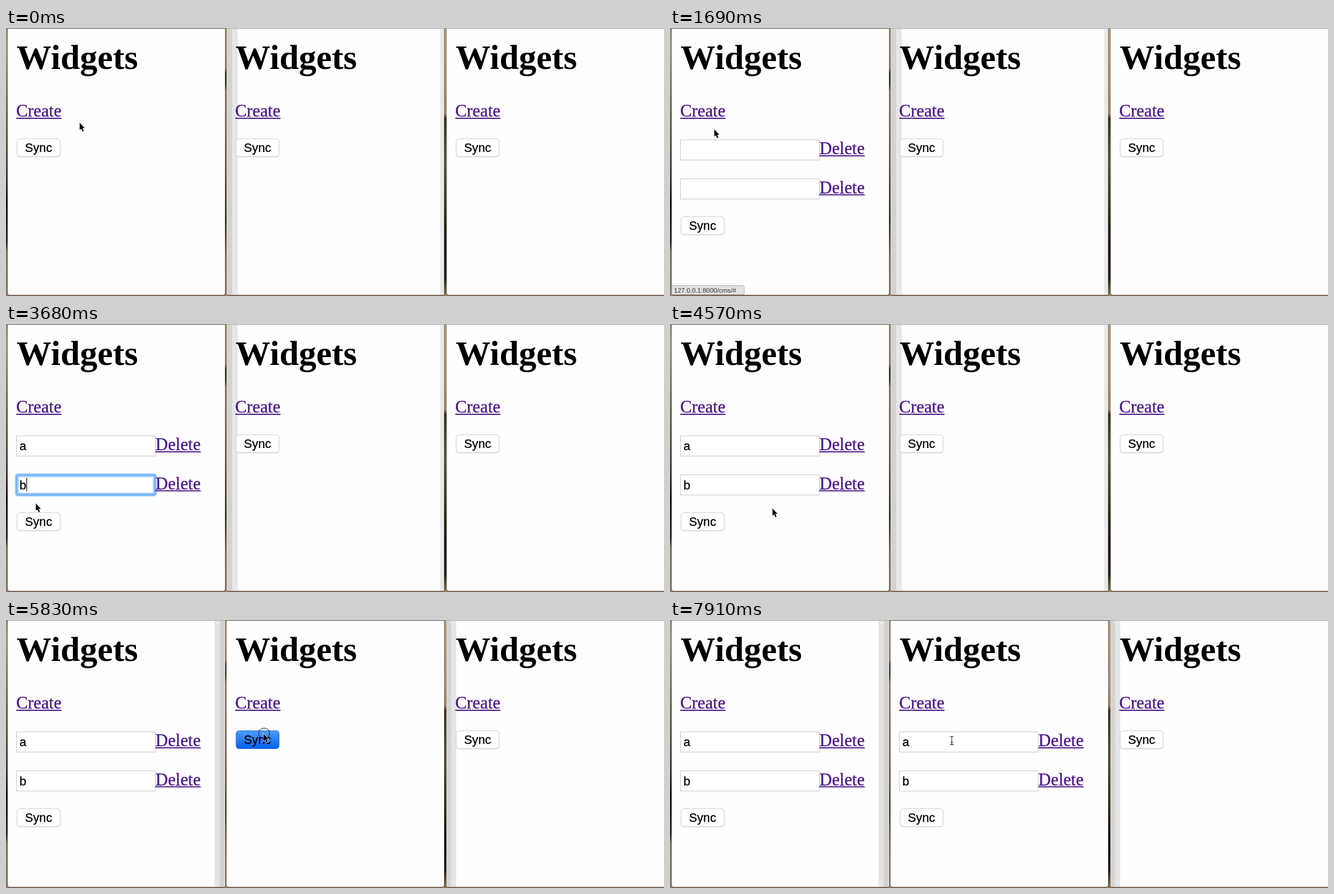
Write an HTML page that moves like this. It is 1170 px wide and 478 px high and loops after 8 s.

```html
<!DOCTYPE html>
<html lang="en">
<head>
<meta charset="utf-8">
<title>Widgets</title>
<style>
  html, body { margin: 0; width: 100%; height: 100%; overflow: hidden; background: #8b775b; }
  svg { display: block; width: 100%; height: 100%; }
  text { white-space: pre; }
  .title { font: bold 62px "Liberation Serif", Times, serif; }
  .link { font: 30.8px "Liberation Serif", Times, serif; stroke-width: .35px; }
  .ui { font: 21.7px "Liberation Sans", Arial, sans-serif; stroke: #000; stroke-width: .3px; }
  .status { font: 11.5px "Liberation Sans", Arial, sans-serif; fill: #222; }
</style>
</head>
<body>
<svg viewBox="0 0 1170 478" preserveAspectRatio="none">
  <defs>
    <linearGradient id="edge" x2="0" y2="1">
      <stop offset="0" stop-color="#9c8a72"/><stop offset=".08" stop-color="#b39a7a"/>
      <stop offset=".25" stop-color="#8d7655"/><stop offset=".55" stop-color="#51412a"/>
      <stop offset=".66" stop-color="#1f170c"/><stop offset=".8" stop-color="#3b2e1a"/>
      <stop offset=".84" stop-color="#8a7657"/><stop offset="1" stop-color="#947f62"/>
    </linearGradient>
    <linearGradient id="gap1" x2="0" y2="1">
      <stop offset="0" stop-color="#a18a6c"/><stop offset=".15" stop-color="#8f7a5c"/>
      <stop offset=".17" stop-color="#2c2318"/><stop offset=".21" stop-color="#2c2318"/>
      <stop offset=".24" stop-color="#8d7858"/><stop offset=".5" stop-color="#6d5a3e"/>
      <stop offset=".72" stop-color="#2a2012"/><stop offset=".85" stop-color="#7b6849"/>
      <stop offset="1" stop-color="#8b775b"/>
    </linearGradient>
    <linearGradient id="gap2" x2="0" y2="1">
      <stop offset="0" stop-color="#b89e7e"/><stop offset=".32" stop-color="#a88d6c"/>
      <stop offset=".34" stop-color="#3c3320"/><stop offset=".5" stop-color="#625538"/>
      <stop offset=".7" stop-color="#3a3018"/><stop offset=".82" stop-color="#1b150a"/>
      <stop offset=".94" stop-color="#2b2212"/><stop offset="1" stop-color="#8b775b"/>
    </linearGradient>
    <linearGradient id="pressed" x2="0" y2="1">
      <stop offset="0" stop-color="#4c9dfc"/><stop offset="1" stop-color="#0560ee"/>
    </linearGradient>
  </defs>
  <rect width="4" height="476" fill="url(#edge)"/>
  <rect x="388" width="5" height="476" fill="url(#gap1)"/>
  <rect x="778" width="7" height="476" fill="url(#gap2)"/>
  <g id="scene"></g>
</svg>
<script>
const LOOP = 8000, PITCH = 69.5, PURPLE = '#4b1788', RED = '#ff1b0e';
const scene = document.getElementById('scene');
const windows = [
  { x: 3, right: 389.5, shift: 0 },
  { x: 392, right: 779, shift: 389.3 },
  { x: 783.5, right: 1175, shift: 780.6 }
];

// Pointer hotspot: time, x, y
const route = [
  [70, 131, 169], [350, 115, 163], [560, 88, 150], [710, 82, 146],
  [1480, 82, 146], [1620, 80, 165], [1800, 77, 205], [1950, 76, 215],
  [2330, 76, 215], [2560, 78, 256], [2740, 74, 288],
  [3510, 74, 288], [3680, 53, 320], [3960, 50, 350],
  [4440, 50, 350], [4570, 181, 329], [4730, 375, 312], [4940, 448, 309],
  [5130, 448, 309], [5300, 453, 240], [5410, 458, 203],
  [6160, 458, 203], [6500, 480, 238], [6800, 507, 276], [6930, 513, 283],
  [7510, 513, 283], [7700, 511, 248], [7910, 501, 215]
];
const clicks = [[880, 950], [1290, 1350], [2030, 2090], [2920, 2970], [4220, 4280], [4970, 5030], [5830, 5860]];

const within = (t, from, to) => t >= from && t < to;
const clamp = v => Math.max(0, Math.min(1, v));

function pointerAt(t) {
  const next = route.findIndex(p => p[0] > t);
  if (next < 0) return route.at(-1).slice(1);
  if (next === 0) return route[0].slice(1);
  const [a, b] = [route[next - 1], route[next]];
  const u = (t - a[0]) / (b[0] - a[0]);
  return [a[1] + (b[1] - a[1]) * u, a[2] + (b[2] - a[2]) * u];
}

const rect = (x, y, w, h, attrs) => `<rect x="${x}" y="${y}" width="${w}" height="${h}" ${attrs}/>`;
const text = (cls, x, y, str, attrs = '') => `<text class="${cls}" x="${x}" y="${y}" ${attrs}>${str}</text>`;
const link = (x, y, str, color) =>
  text('link', x, y, str, `fill="${color}" stroke="${color}"`) + rect(x, y + 2, 80.5, 2, `fill="${color}"`);

function frame(w, active, shades) {
  const width = w.right - w.x;
  return rect(w.x - .5, -10, width + 1, 486.5, 'rx="4" fill="none" stroke="#000" stroke-opacity=".3"') +
    rect(w.x, -10, width, 486, 'rx="4" fill="#fefefe"') +
    shades.map(([x, wide, color]) => rect(x, 1, wide, 475, `rx="2.5" fill="${color}"`)).join('') +
    rect(w.x, 0, width, 1.4, `fill="${active ? '#747474' : '#b4b4b4'}"`);
}

function input(y, value, focused, caret) {
  const caretX = 24.5 + (value ? 12.2 : 0);
  const ring = focused
    ? rect(19.5, y + 1.5, 245, 34, 'rx="2" fill="none" stroke="#c9e1fd" stroke-width="7.5"') +
      rect(19, y + 1, 246, 35, 'rx="2" fill="none" stroke="#7eb8fc" stroke-width="4.5"')
    : '';
  return rect(18.5, y + .5, 247, 36, 'fill="#fff" stroke="#c6c6c6"') + ring +
    text('ui', 24, y + 26, value) +
    (caret ? rect(caretX - .5, y + 6, 1.2, 24, '') : '');
}

function button(y, pressed) {
  const look = pressed ? 'fill="url(#pressed)" stroke="#1f6fe0"' : 'fill="#fff" stroke="#cdcdcd"';
  return (pressed ? '' : rect(19.8, y + 1.3, 76.6, 32, 'rx="5.5" fill="#b2b2b2"')) +
    rect(19.8, y + .5, 76.6, 32, `rx="5.5" ${look}`) + text('ui', 33.8, y + 24, 'Sync');
}

function page({ shift, rows = [], focus = -1, caret = false, linkColor = PURPLE, pressed = false }) {
  const list = rows.map((value, i) =>
    input(199 + i * PITCH, value, focus === i, focus === i && caret) +
    link(265.7, 225 + i * PITCH, 'Delete', PURPLE)).join('');
  return `<g transform="translate(${shift})">` + text('title', 18.8, 73, 'Widgets') +
    link(18.2, 158, 'Create', linkColor) + list + button(197 + rows.length * PITCH, pressed) + '</g>';
}

const shapes = {
  arrow: '<path d="M0 0V13L2.9 10.4L5 15.6L7.3 14.6L5.1 9.6H9Z" stroke="#fff" stroke-width="1.3" paint-order="stroke"/>',
  hand: '<path d="M-1.5 1Q0 -1.5 1.5 1V5.5L4 6L6.5 6.8L8.5 8V11.5L7 16H-1.5L-5 10.5Q-4.5 7.5 -1.5 10Z" fill="#fff" stroke="#000" stroke-width="1.2"/><path d="M1.5 9.5V13M3.7 9.5V13M5.8 9.5V13" stroke="#000" stroke-width=".8"/>',
  beam: '<path d="M-3.5 -7.5Q0 -7.5 0 -5.5Q0 -7.5 3.5 -7.5M0 -5.5V5.5M-3.5 7.5Q0 7.5 0 5.5Q0 7.5 3.5 7.5M-2 3H2" fill="none" stroke="#222" stroke-width="1.1"/>'
};

function pointer(t, leftRows, middleRows) {
  const [x, y] = pointerAt(t);
  const overInput = (left, count) => x > left && x < left + 248 &&
    Array.from({ length: count }, (_, i) => 199 + i * PITCH).some(top => y > top && y < top + 37);
  let kind = 'arrow';
  if (x > 18 && x < 99 && y > 133 && y < 164) kind = 'hand';
  else if (overInput(18, leftRows) || (t >= 6210 && overInput(407, middleRows))) kind = 'beam';
  const clicking = clicks.some(([from, to]) => within(t, from, to));
  return `<g transform="translate(${x} ${y})">${shapes[kind]}` +
    (clicking ? '<circle cx="1" cy="-.5" r="9.7" fill="none" stroke="#111"/>' : '') + '</g>';
}

function statusBar(t) {
  const opacity = clamp((t - 540) / 150) * clamp((1860 - t) / 180);
  return `<g opacity="${opacity}"><path d="M3 459.5H129Q132 459.5 132 462.5V475.5H3Z" fill="#e2e2e2" stroke="#aaa"/>` +
    text('status', 7, 471.5, '127.0.0.1:8000/cms/#') + '</g>';
}

function draw(t) {
  const middleActive = t >= 4970;
  const rows = [];
  if (t >= 1050) rows.push(t >= 2270 ? 'a' : '');
  if (t >= 1410) rows.push(t >= 3330 ? 'b' : '');
  const middleRows = t >= 5860 ? ['a', 'b'] : [];
  const focus = within(t, 2030, 2920) ? 0 : within(t, 2920, 4220) ? 1 : -1;
  const caret = !within(t, 2740, 2920) && t < 3830;
  const redLink = within(t, 880, 1050) || within(t, 1290, 1410);
  const shades = middleActive
    ? [[[370.5, 19, '#e5e5e5'], [380, 9.5, '#d2d2d2']], [], [[783.5, 17, '#e5e5e5'], [783.5, 8, '#d5d5d5']]]
    : [[], [[392, 20, '#e6e6e6'], [392, 10, '#d3d3d3'], [772, 7, '#e9e9e9']], []];

  scene.innerHTML =
    windows.map((w, i) => frame(w, i === (middleActive ? 1 : 0), shades[i])).join('') +
    page({ shift: windows[0].shift, rows, focus, caret,
      linkColor: redLink ? RED : PURPLE, pressed: within(t, 4220, 4280) }) +
    page({ shift: windows[1].shift, rows: middleRows, pressed: within(t, 5830, 5860) }) +
    page({ shift: windows[2].shift }) +
    statusBar(t) + pointer(t, rows.length, middleRows.length);
}

const start = performance.now();
function tick() {
  draw((performance.now() - start) % LOOP);
  requestAnimationFrame(tick);
}
tick();
</script>
</body>
</html>
```
